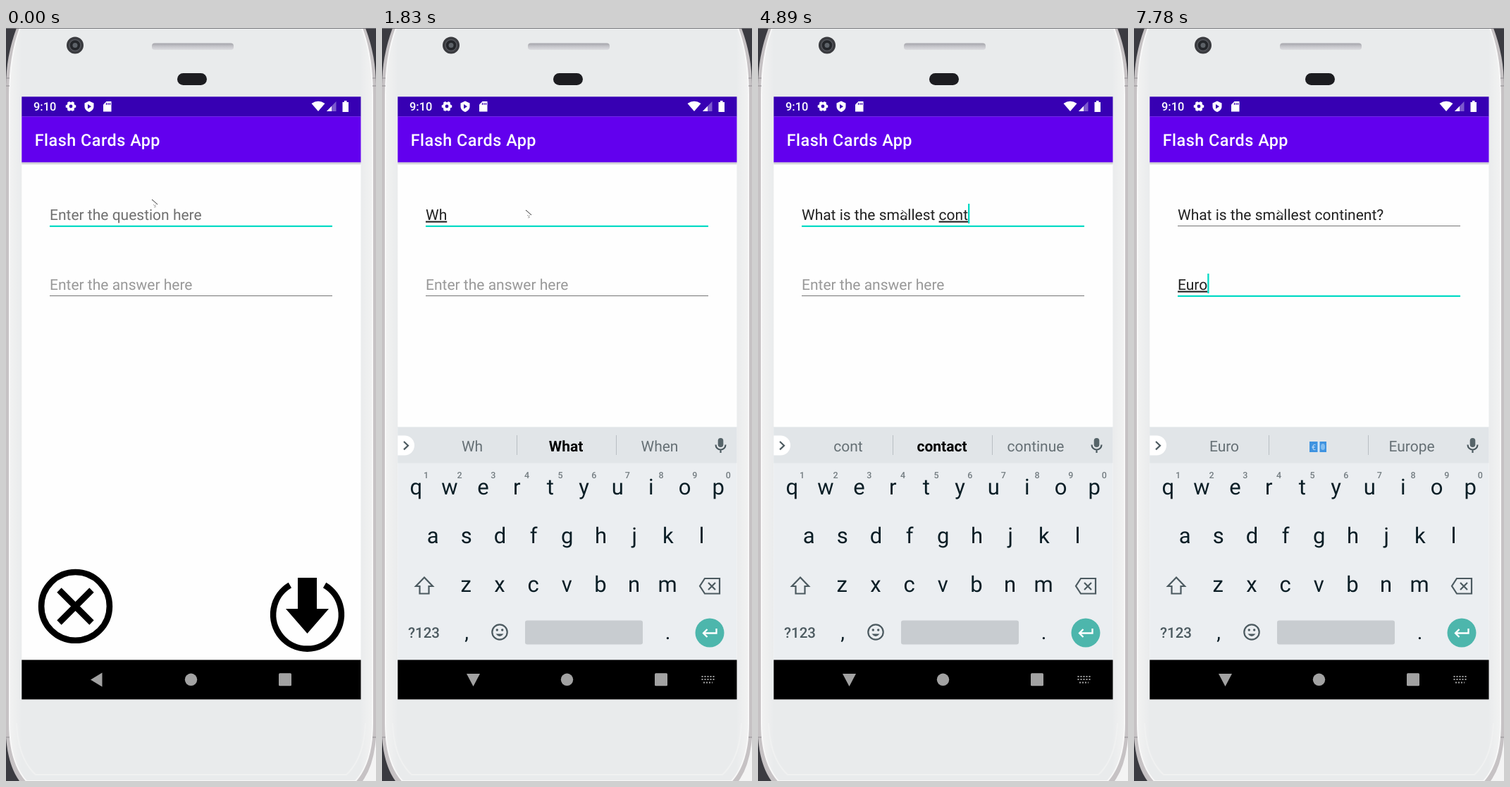
An HTML page that plays this animation: 525x1067 px, repeating every 8 s.

```html
<!DOCTYPE html>
<html lang="en">
<head>
<meta charset="utf-8">
<title>Flash Cards App</title>
<style>
  html, body { margin: 0; width: 100%; height: 100%; overflow: hidden; background: #3b3b41; }
  svg { display: block; width: 100%; height: 100%; }
  text { font-family: Roboto, sans-serif; white-space: pre; text-rendering: geometricPrecision; }
  .field { font-size: 21px; }
  .mid { text-anchor: middle; }
  .line { fill: none; stroke: #4c5a60; stroke-width: 2.2; }
  .word { text-decoration: underline; }
</style>
</head>
<body>
<svg viewBox="0 0 525 1067" preserveAspectRatio="none">
  <defs>
    <linearGradient id="shade" x2="0" y2="1"><stop stop-color="#bdbdc4"/><stop offset="1" stop-color="#fefefe"/></linearGradient>
    <linearGradient id="mesh" x2="0" y2="1"><stop stop-color="#a4a4aa"/><stop offset=".5" stop-color="#c6c6cb"/><stop offset="1" stop-color="#dddde1"/></linearGradient>
    <linearGradient id="bevel"><stop stop-color="#f2f2f2"/><stop offset=".035" stop-color="#e9ebec"/><stop offset=".965" stop-color="#e9ebec"/><stop offset="1" stop-color="#f2f2f2"/></linearGradient>
  </defs>

  <!-- phone body -->
  <path d="M500 1000h25v67h-25z" fill="#f4f4f4"/>
  <path d="M15 0Q0 40 0 82V1005Q3 1045 19 1067H506Q522 1045 525 1005V82Q525 40 510 0z" fill="#c6c2c4"/>
  <path d="M20 0Q5 40 5 95V985Q5 1040 29 1067H496Q520 1040 520 985V95Q520 40 505 0z" fill="url(#bevel)" stroke="#f8f8f8" stroke-width="2"/>
  <path d="M15 985Q17 1035 42 1058H483Q508 1035 510 985" fill="none" stroke="#f0f1f1" stroke-width="2"/>
  <path d="M0 71H5M0 82H5M520 71H525M520 82H525M0 1005H5M520 1005H525" stroke="#8f8c90"/>
  <path d="M0 .5H525" stroke="#77777b"/>
  <circle cx="98" cy="24.5" r="12" fill="#3a3b3f"/>
  <circle cx="98" cy="24.5" r="8" fill="#24262a" stroke="#55575d" stroke-width="1.5"/>
  <circle cx="98" cy="24.5" r="3.5" fill="#5d6268"/>
  <rect x="207" y="21.500" width="116" height="9.500" rx="4" fill="url(#mesh)"/>
  <rect x="243" y="64" width="42" height="17" rx="8.500" fill="#1c1c20"/>

  <!-- screen -->
  <rect x="22.300" y="97.300" width="481.200" height="854" fill="#fefefe"/>
  <rect x="22.300" y="97.300" width="481.200" height="28.200" fill="#3700b3"/>
  <rect x="22.300" y="125.300" width="481.200" height="65.200" fill="#6200ee"/>
  <rect x="22.300" y="190.500" width="481.200" height="4" fill="url(#shade)"/>
  <text x="40.700" y="167" fill="#fff" font-size="23.400" font-weight="500" letter-spacing=".5">Flash Cards App</text>
  <g fill="#fff">
    <text x="39" y="117.300" font-size="16.400" font-weight="500">9:10</text>
    <circle cx="92" cy="111" r="4.200" fill="none" stroke="#fff" stroke-width="3.600"/>
    <circle cx="92" cy="111" r="6" fill="none" stroke="#fff" stroke-width="2.600" pathLength="12" stroke-dasharray="1.1 .9" stroke-dashoffset=".55"/>
    <path d="M118 103.500l6.500 3v4.500c0 4-2.800 6.800-6.500 8-3.700-1.200-6.500-4-6.500-8v-4.500z"/>
    <path d="M116 108v6.500l5-3.250z" fill="#3700b3"/>
    <path d="M142.500 104h7v14.500h-11.500v-10z"/>
    <path d="M142.500 106v3M145 106v3M147.500 106v3" stroke="#3700b3" stroke-width="1.200"/>
    <path d="M443 118L433.500 107Q443 100.500 452.500 107z"/>
    <path d="M455 118h13.500v-14z" opacity=".35"/>
    <path d="M455 118h7v-7.300z"/>
    <path d="M477.500 105h2.500v-2h3.500v2h2.500v14h-8.500z"/>
  </g>

  <path id="qLine"/><path id="aLine"/>
  <text id="qText" class="field" x="62" y="271.500"></text>
  <text id="aText" class="field" x="62" y="370.500"></text>
  <rect id="caret" width="2.300" height="28" fill="#03dac5"/>

  <g fill="none" stroke="#000">
    <circle cx="98.500" cy="819.400" r="48.400" stroke-width="8.600"/>
    <path d="M75.500 796.500l46 46m0-46l-46 46" stroke-width="9"/>
    <path d="M402.900 789.500A48.400 48.400 0 1 0 452.100 789.500" stroke-width="8.600"/>
    <path d="M414 779h27v44h17L427.500 858 397 823h17z" fill="#000" stroke="none"/>
  </g>

  <g id="keyboard"></g>

  <rect x="22.300" y="895.400" width="481.200" height="56" fill="#000"/>
  <g fill="#a2a2a2">
    <path id="back"/>
    <circle cx="262.500" cy="923.300" r="8.700"/>
    <rect x="387" y="914.300" width="18" height="18" rx="1.500"/>
    <path id="imeIcon" d="M453.500 919h18M453.500 923h18M456 927.500h13" stroke="#a2a2a2" stroke-width="2" stroke-dasharray="2 2"/>
  </g>

  <g id="mouse">
    <path d="M204 258l8 7-3.500 1z" fill="#fff"/>
    <path d="M204 258l8 7" stroke="#333"/>
    <path d="M206 265l2 2 2-1.500M207 269l3-1" fill="none" stroke="#999" stroke-width=".9"/>
  </g>
</svg>

<script>
const LOOP = 8000;
const $ = id => document.getElementById(id);
const set = (el, attrs) => { for (const k in attrs) el.setAttribute(k, attrs[k]); };

const label = (s, x, y, size = 31, fill = '#0b1e26', extra = '') =>
  `<text class="mid" x="${x}" y="${y}" font-size="${size}" fill="${fill}" ${extra}>${s}</text>`;
const keyRow = (keys, x, y) => [...keys].map((k, i) => label(k, x + i * 47.65, y)).join('');

$('keyboard').innerHTML = `
  <rect x="22.300" y="565" width="481.200" height="331" fill="#ebeef1"/>
  <rect x="22.300" y="565" width="481.200" height="51.500" fill="#e1e5e8"/>
  <path d="M22.300 565.500H503.500" stroke="#eceeef"/>
  <path d="M22.300 577.500H32a14 14 0 0 1 0 28H22.300z" fill="#fff"/>
  <path class="line" d="M31 586l6 5.700-6 5.700"/>
  <path d="M191.500 577v28M332.500 577v28" stroke="#b9bfc3"/>
  ${[128, 261, 394].map((x, i) => label('', x, 599.700, 21, '#667075', `id="tip${i}"`)).join('')}
  <g id="note">
    <rect x="249" y="586" width="24" height="15" fill="#3f93e0"/>
    <rect x="260.500" y="586" width="3" height="15" fill="#d5e8f8"/>
    <text class="mid" x="255" y="597.500" font-size="11" fill="#c6e0f8">€</text>
    <ellipse cx="268" cy="593.500" rx="3" ry="4.500" fill="#82bdf0"/>
  </g>
  <rect x="476.700" y="581" width="7.600" height="13" rx="3.800" fill="#566469"/>
  <path class="line" d="M473.500 590.500a7 7 0 0 0 14 0M480.500 597.500v4.500"/>
  ${keyRow('qwertyuiop', 48.3, 661.3)}
  ${[...'1234567890'].map((n, i) => label(n, 62.5 + i * 47.65, 638, 12.5, '#737c81', 'font-weight="500"')).join('')}
  ${keyRow('asdfghjkl', 72.2, 730)}
  ${keyRow('zxcvbnm', 119.3, 798.5)}
  <path class="line" d="M60 778.500L72 791h-5.500v10.500h-13V791H48z"/>
  <path class="line" d="M458 780h21v21.500h-21l-7-10.750zM463 786l10 10m0-10l-10 10"/>
  ${label('?123', 59.5, 864, 20.5, '#4c5a60', 'font-weight="500"')}
  ${label(',', 120, 866, 29)}${label('.', 405.5, 866, 29)}
  <circle class="line" cx="167" cy="856" r="10.700"/>
  <path d="M161.500 858.500q5.500 7 11 0z" fill="#4c5a60"/>
  <circle cx="163.300" cy="853" r="1.700" fill="#4c5a60"/><circle cx="170.700" cy="853" r="1.700" fill="#4c5a60"/>
  <rect x="203" y="839.500" width="167" height="34" rx="3" fill="#c8ccd0"/>
  <circle cx="465" cy="857" r="20.500" fill="#4db6ac"/>
  <path d="M474.500 851v6.500H456m5.500-5.500l-5.500 5.500 5.500 5.500" fill="none" stroke="#fff" stroke-width="2.300"/>`;

// [start ms, typed text ("_" opens the underlined word), suggestions ("*" = bold)]
const QUESTION = [
  [0, '', 'you|I|thanks'],
  [1120, '_W', 'W|*We|What'],
  [1270, '_Wh', 'Wh|*What|When'],
  [1970, '_Wha', 'Wh|*What|When'],
  [2110, '_What', 'Wha|*What|whatever'],
  [2250, '_What', 'What|*What|whatever'],
  [2380, 'What ', 'is|are|do'],
  [2660, 'What _i', 'is|are|do'],
  [2790, 'What _is', 'i|*I|is'],
  [2910, 'What is ', 'the|your|it'],
  [3050, 'What is _t', 't|*the|to'],
  [3190, 'What is _the', 'the|*the|they'],
  [3320, 'What is the ', 'best|same|first'],
  [3460, 'What is the _s', 's|*same|second'],
  [3600, 'What is the _sma', 'sma|*small|smart'],
  [3740, 'What is the _small', 'small|*small|smallest'],
  [3870, 'What is the _smalles', 'smalles|*smallest|smaller'],
  [4120, 'What is the _smallest', 'smalles|*smallest|smaller'],
  [4270, 'What is the smallest ', 'and|one|in the'],
  [4580, 'What is the smallest _c', 'c|*can|course'],
  [4890, 'What is the smallest _cont', 'cont|*contact|continue'],
  [5030, 'What is the smallest _conti', 'conti|*continue|continues'],
  [5170, 'What is the smallest _contin', 'contin|*continue|continental'],
  [5310, 'What is the smallest _continen', 'continen|*continent|continental'],
  [5580, 'What is the smallest _continent', 'continent|*continent|continental'],
  [5840, 'What is the smallest continent?', 'continent|*continent|continental'],
  [6100, 'What is the smallest continent?', 'you|I|what']
];
const ANSWER = [
  [6500, '', 'you|I|what'],
  [7390, '_E', 'E|*Even|Every'],
  [7520, '_Eu', 'Eu|*Eu|Europe'],
  [7650, '_Eur', 'Eur|*Euro|Europe'],
  [7780, '_Euro', 'Euro|note|Europe']
];
const CARET_OFF = [[0, 240], [970, 1120], [1830, 1970], [6960, 7390]];

const at = (steps, t) => steps.filter(s => s[0] <= t).pop();

function write(el, typed, hint, hintColor) {
  const [plain, word = ''] = typed.split('_');
  el.innerHTML = typed ? `${plain}<tspan class="word">${word}</tspan>` : hint;
  el.setAttribute('fill', typed ? '#212121' : hintColor);
  return typed ? el.getComputedTextLength() : 0;
}

const underline = (el, y, active) => set(el, {
  d: `M62 ${active ? y + .4 : y}H463`,
  stroke: active ? '#03dac5' : '#757575',
  'stroke-width': active ? 2.2 : 1.2
});

function draw(t) {
  const q = at(QUESTION, t), a = at(ANSWER, t);
  const qWidth = write($('qText'), q[1], 'Enter the question here', t < 120 ? '#707070' : '#999');
  const aWidth = write($('aText'), a ? a[1] : '', 'Enter the answer here', '#999');
  underline($('qLine'), 280.5, !a);
  underline($('aLine'), 379.5, a);
  set($('caret'), {
    x: 62 + (a ? aWidth : qWidth),
    y: a ? 348 : 249,
    opacity: CARET_OFF.some(([from, to]) => t >= from && t < to) ? 0 : 1
  });

  (a || q)[2].split('|').forEach((s, i) => {
    const bold = s[0] === '*', tip = $('tip' + i);
    tip.textContent = s === 'note' ? '' : s.replace('*', '');
    set(tip, { 'font-weight': bold ? 700 : 400, fill: bold ? '#000' : '#667075' });
  });
  $('note').style.display = a && a[2].includes('note') ? '' : 'none';

  const open = t >= 240;
  const [alpha, drop] = !open ? [0, 0] : t < 390 ? [.7, 14] : t < 540 ? [.97, 0] : [1, 0];
  set($('keyboard'), { opacity: alpha, transform: `translate(0 ${drop})` });
  set($('back'), { d: open ? 'M120 915h19l-9.500 18z' : 'M136.500 913.500v20L120 923.500z' });
  $('imeIcon').style.display = open ? '' : 'none';
  set($('mouse'), { transform: t < 120 ? 'translate(3 -15)' : '' });
}

const start = performance.now();
(function tick() {
  draw((performance.now() - start) % LOOP);
  requestAnimationFrame(tick);
})();
</script>
</body>
</html>
```
